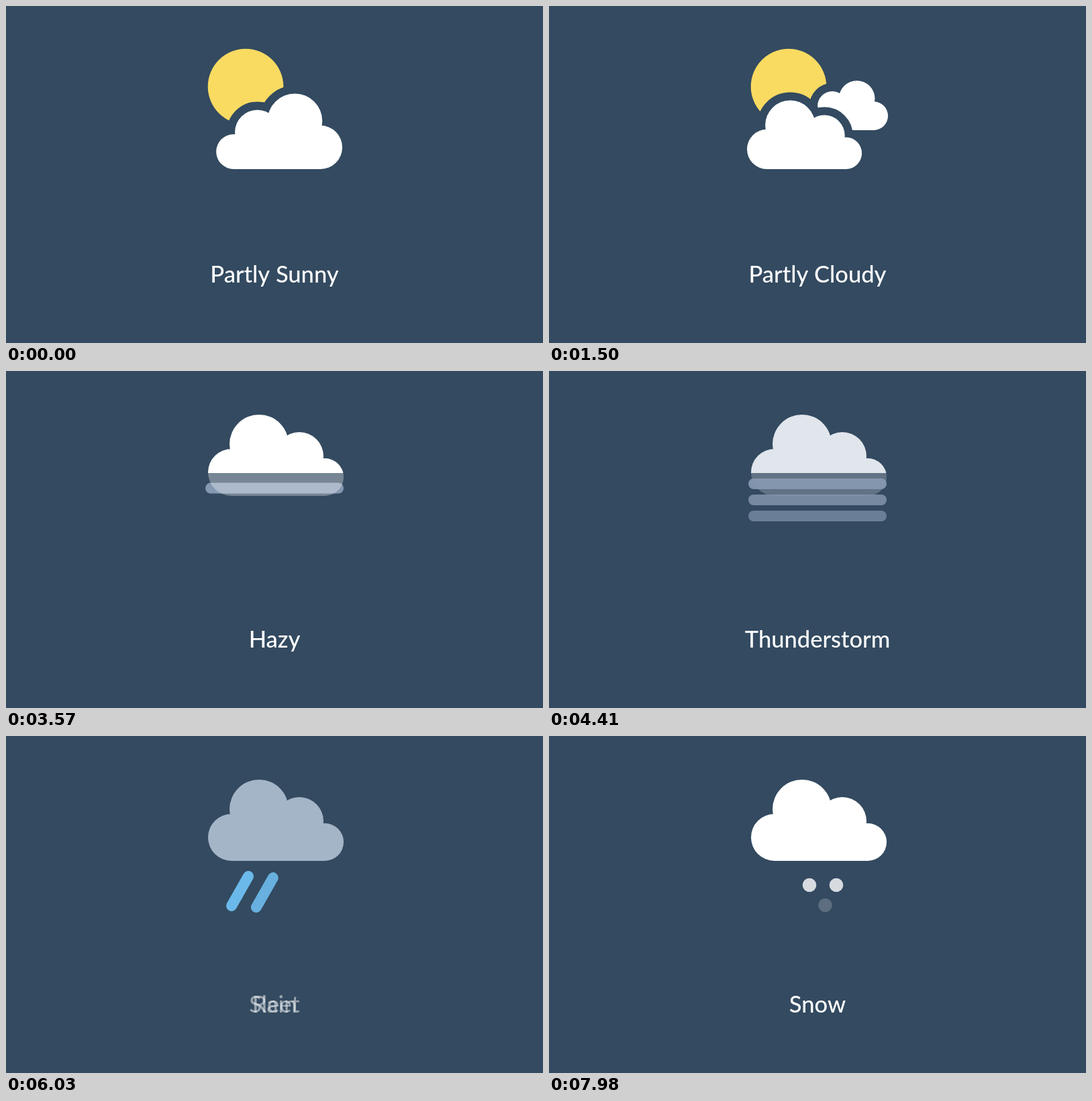
Animation of 800x502 px, one loop 8 s. Source, as an HTML page with a canvas:

```html
<!DOCTYPE html>
<html lang="en">
<head>
<meta charset="utf-8">
<title>Weather icons</title>
<style>
html, body { margin: 0; width: 100%; height: 100%; overflow: hidden; background: #334a60; }
canvas { display: block; }
</style>
</head>
<body>
<canvas id="stage" width="800" height="502"></canvas>
<script>
const LOOP = 8000, BG = '#334a60', SUN = '#f9db62', BLUE = '#6bb9ea', HAZE = '#8598b1';
const WHITE = [255, 255, 255], GREY = [165, 181, 200];
const ctx = document.getElementById('stage').getContext('2d');

const ramp = (t, a, b) => Math.min(1, Math.max(0, (t - a) / (b - a)));
const inOut = p => p < .5 ? 4 * p ** 3 : 1 - (2 - 2 * p) ** 3 / 2;
const overshoot = p => 1 + 2.2 * (p - 1) ** 3 + 1.2 * (p - 1) ** 2;
const mix = (a, b, p) => a.map((v, i) => v + (b[i] - v) * p);
const rgb = c => `rgb(${c.map(Math.round).join()})`;

// Carries a list of values through steps of [start, end, goal, ease].
const track = (t, first, ...steps) => steps.reduce(
  (v, [a, b, goal, ease = inOut]) => mix(v, goal, ease(ramp(t, a, b))), first);
const fade = (t, a, b, c = 1e5, d = 2e5) => ramp(t, a, b) * (1 - ramp(t, c, d));

// Unit cloud: left edge at 0, base at 0, 202 wide.
const cloudPath = new Path2D();
for (const [x, y, r] of [[35, -35, 35], [76, -77, 44], [136, -59, 36], [174, -28, 28]]) {
  cloudPath.moveTo(x + r, y);
  cloudPath.arc(x, y, r, 0, 7);
}
cloudPath.rect(35, -50, 139, 50);

function paint(alpha, draw) {
  if (alpha <= 0) return;
  ctx.save();
  ctx.globalAlpha = alpha;
  draw();
  ctx.restore();
}

// A mirrored cloud is placed by its right edge.
function cloud([x, y, s], color = '#fff', alpha = 1, mirror = false, gap = 12) {
  paint(alpha, () => {
    ctx.translate(x, y);
    ctx.scale(mirror ? -s : s, s);
    if (gap) {
      ctx.strokeStyle = BG;
      ctx.lineWidth = 2 * gap / s;
      ctx.stroke(cloudPath);
    }
    ctx.fillStyle = color;
    ctx.fill(cloudPath);
  });
}

function dot(x, y, r, color, alpha = 1) {
  paint(alpha, () => {
    ctx.fillStyle = color;
    ctx.beginPath();
    ctx.arc(x, y, r, 0, 7);
    ctx.fill();
  });
}

// A slanted streak reaching down and left from its upper end.
function streak(x, y, length, color, alpha) {
  paint(alpha, () => {
    ctx.strokeStyle = color;
    ctx.lineWidth = 16;
    ctx.lineCap = 'round';
    ctx.beginPath();
    ctx.moveTo(x, y);
    ctx.lineTo(x - 25 * length, y + 44 * length);
    ctx.stroke();
  });
}

function clipped(y, h, draw) {
  ctx.save();
  ctx.beginPath();
  ctx.rect(0, y, 800, h);
  ctx.clip();
  draw();
  ctx.restore();
}

function hazeBars(t) {
  for (let i = 0; i < 3; i++) {
    const enter = ramp(t, 3480 + i * 100, 3645 + i * 110);
    const leave = ramp(t, 4400 - 25 * i, 4590 - 25 * i);
    paint(Math.min(1, enter * 4) * (1 - leave), () => {
      ctx.fillStyle = HAZE;
      ctx.beginPath();
      ctx.roundRect(297, 160 + 24 * i + 18 * (1 - inOut(enter)), 206, 16, 8);
      ctx.fill();
    });
  }
}

function sky(t) {
  if (t < 2850) {
    const [x, y] = track(t, [357, 120], [2280, 2850, [412, 173]]);
    dot(x, y, 56.3, SUN);
  }
  if (t < 3450) {
    const back = track(t, [501, 243, .93],
      [630, 1180, [505, 185, .61], overshoot],
      [1500, 1830, [505, 176, .769]],
      [2490, 2850, [506, 166, .91], overshoot],
      [3120, 3420, [460, 186, .6]]);
    // The cut-out in the sun runs ahead of the cloud.
    const [ahead] = track(t, [0], [2280, 2850, [72]]);
    cloud([back[0] - ahead, back[1], back[2]], BG, 1, true);
    cloud(back, '#fff', 1, true);
  }
  const place = track(t, [247, 243, .5],
    [700, 1230, [295, 243, .847], overshoot],
    [1500, 1830, [296, 243, .911]],
    [2490, 2850, [295, 243, .95], overshoot],
    [3120, 3450, [301, 186, 1]]);
  const tint = ramp(t, 4340, 4550) - ramp(t, 7440, 7700);
  const color = rgb(mix(WHITE, GREY, tint));
  if (t < 3450) return cloud(place, color, ramp(t, 700, 900));

  // The base dissolves above the haze and returns beneath it.
  const low = 1 - ramp(t, 3450, 3630) + ramp(t, 4360, 4560);
  const base = () => clipped(152, 50, () => cloud(place, color, low, false, 0));
  clipped(0, 152, () => cloud(place, color, 1, false, 0));
  const layers = [hazeBars, base];
  if (t > 4200) layers.reverse();
  for (const draw of layers) draw(t);
}

function bolt(t) {
  paint(fade(t, 4560, 4760, 5070, 5270), () => {
    ctx.fillStyle = SUN;
    ctx.beginPath();
    for (const [x, y] of [[393, 199], [422, 199], [410, 226], [428, 226], [384, 276], [394, 239], [376, 239]])
      ctx.lineTo(x, y);
    ctx.fill();
  });
}

function rain(t) {
  for (let i = 0; i < 3; i++) {
    const x = 361 + 38 * i, late = 110 * i;
    const grow = ramp(t, 5290 + late, 5600 + late);
    const fall = ramp(t, 6100 - late, 6250 - late) ** 2;
    streak(x - 16 * fall, 209 + 28 * fall, inOut(grow), BLUE, Math.min(1, grow * 4) * (1 - fall));

    const sleet = fade(t, 6200 + 50 * i, 6380 + 50 * i, 6740 - 40 * i, 6900 - 40 * i);
    streak(x, 209, .42 * sleet, BLUE, sleet);
    dot(x - 25, 253, 8, '#fff', sleet);

    const hail = fade(t, 6900 + 80 * i, 7180 + 80 * i, 7440, 7640);
    dot(x, 211, 8, '#fff', hail);
    dot(x - 22, 249, 8, '#fff', hail);
  }
}

function snow(t) {
  dot(388, 222, 10.3, '#fff', ramp(t, 7780, 8030));
  dot(428, 222, 10.3, '#fff', ramp(t, 7780, 8030));
  dot(411.5, 252, 10.3, '#fff', ramp(t, 7930, 8180));
}

const width = s => ctx.measureText(s).width;
const start = s => 400 - width(s) / 2;
const tail = (s, word) => 400 + width(s) / 2 - width(word);

function word(text, alpha, x = start(text)) {
  paint(alpha, () => ctx.fillText(text, x, 412));
}

function labels(t) {
  ctx.font = '500 34.5px Lato, "Open Sans", sans-serif';
  ctx.fillStyle = '#fff';
  const [partly] = track(t, [start('Partly Sunny')], [630, 930, [start('Partly Cloudy')]]);
  const [cloudy] = track(t, [tail('Partly Cloudy', 'Cloudy')],
    [1500, 1830, [tail('Mostly Cloudy', 'Cloudy')]],
    [2280, 2850, [start('Cloudy')]]);
  word('Partly', 1 - ramp(t, 1500, 1680), partly);
  word('Sunny', 1 - ramp(t, 630, 830), tail('Partly Sunny', 'Sunny'));
  word('Cloudy', fade(t, 760, 960, 3120, 3320), cloudy);
  word('Mostly', fade(t, 1600, 1800, 2450, 2650), start('Mostly Cloudy'));
  word('Hazy', fade(t, 3220, 3420, 4200, 4370));
  word('Thunderstorm', fade(t, 4220, 4400, 5070, 5270));
  word('Rain', fade(t, 5120, 5320, 5930, 6130));
  word('Sleet', fade(t, 5930, 6130, 6660, 6860));
  word('Hail', fade(t, 6660, 6860, 7460, 7660));
  word('Snow', fade(t, 7460, 7660));
}

function frame(now) {
  const t = now % LOOP;
  ctx.fillStyle = BG;
  ctx.fillRect(0, 0, 800, 502);
  sky(t);
  bolt(t);
  rain(t);
  snow(t);
  labels(t);
  requestAnimationFrame(frame);
}
requestAnimationFrame(frame);
</script>
</body>
</html>
```
